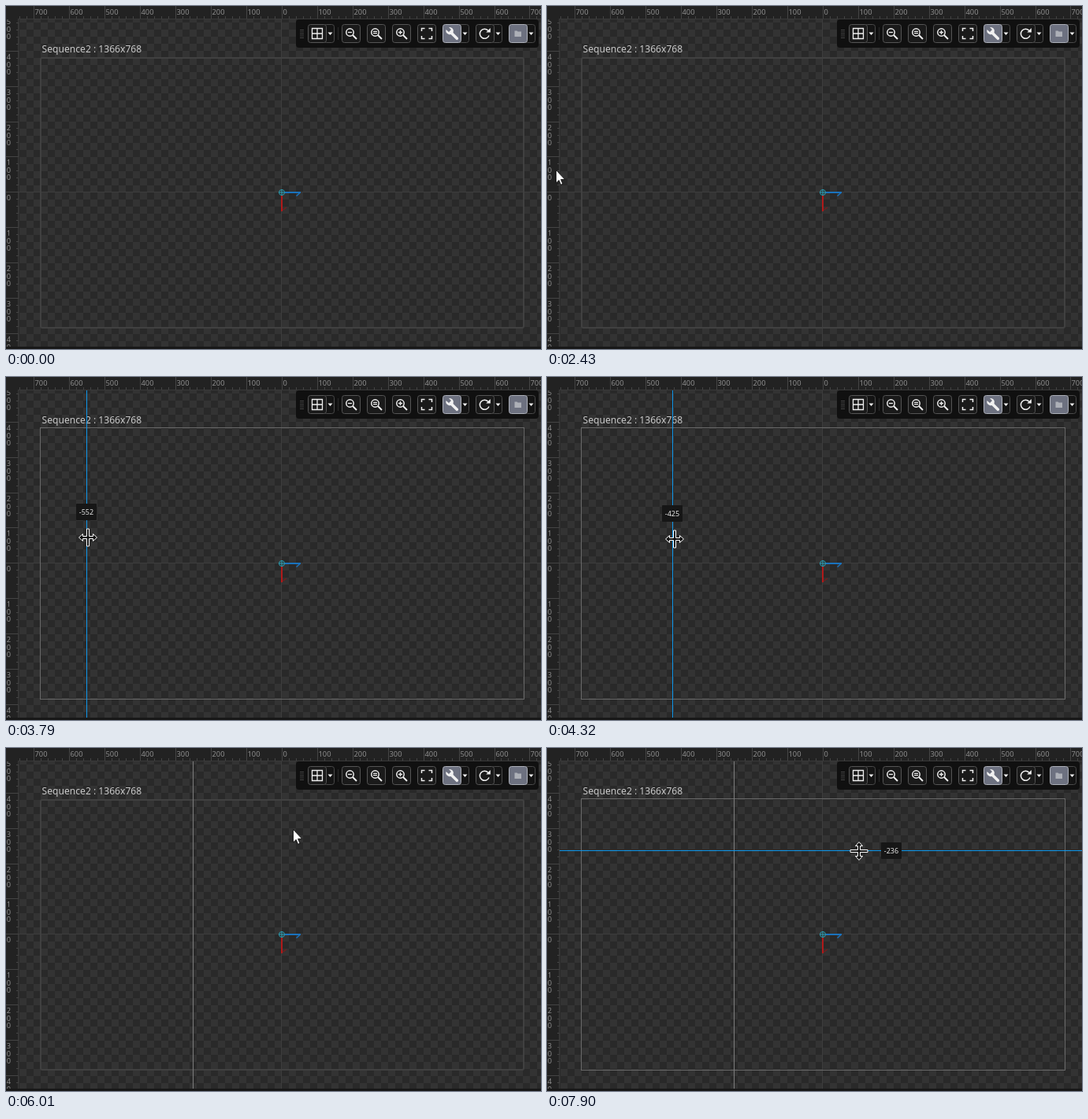
An HTML page that plays this animation: 679x436 px, repeating every 8 s.

```html
<!DOCTYPE html>
<html lang="en">
<head>
<meta charset="utf-8">
<title>Dragging guides</title>
<style>
html, body { margin: 0; width: 100%; height: 100%; overflow: hidden; background: #222; }
svg { display: block; width: 679px; height: 436px; }
text { font-family: "Noto Sans", "Open Sans", sans-serif; }
.num { font-size: 9.33px; fill: #8c8c8c; }
.tip { font-size: 9px; fill: #e4e4e4; text-anchor: middle; }
.icon { fill: none; stroke: #f0f0f0; stroke-width: 1.5; }
.faint { fill: none; stroke: #444; }
</style>
</head>
<body>
<svg id="stage" width="679" height="436" viewBox="0 0 679 436">
  <defs>
    <pattern id="checker" x="350" y="237" width="18" height="18" patternUnits="userSpaceOnUse">
      <path d="M0 0h18v18h-18z" fill="#292929"/>
      <path d="M0 0h9v9h-9zM9 9h9v9h-9z" fill="#333"/>
    </pattern>
    <clipPath id="view"><path d="M16 17H679V433H16z"/></clipPath>
    <clipPath id="side"><path d="M0 17H16V433H0z"/></clipPath>
  </defs>
  <path d="M0 0H679V436H0z" fill="#222"/>
  <g clip-path="url(#view)">
    <path d="M16 17H679V433H16z" fill="url(#checker)"/>
    <path d="M349.5 17V433M16 236.5H679" stroke="#3d3d3d"/>
    <rect id="dim" x="44" y="66" width="613" height="343" rx="2" fill="none" stroke="#404040" stroke-width="2"/>
    <rect id="lit" x="43.5" y="64.5" width="614" height="345" fill="none" stroke="#696969"/>
    <text x="45.6" y="59" font-size="12.1" fill="#c9c9c9">Sequence2 : 1366x768</text>
    <g fill="none">
      <path d="M350 241V261" stroke="#b01a1a" stroke-width="2"/>
      <path d="M351 259.5L356 256" stroke="#702020" stroke-width="1.5"/>
      <path d="M354 237H374" stroke="#1a72bd" stroke-width="2"/>
      <path d="M373 237.5L368.5 241.5" stroke="#1a72bd" stroke-width="1.5"/>
      <path d="M346 237H354M350 233V241" stroke="#2a9fb4"/>
      <circle cx="350" cy="237" r="3.5" stroke="#2a9fb4"/>
    </g>
    <rect id="lineX" y="17" width="1" height="416"/>
    <rect id="lineY" x="16" width="663" height="1"/>
    <g id="tip">
      <rect x="-13" y="-10.5" width="26" height="21" rx="1" fill="#161616"/>
      <text id="tipText" class="tip" y="3.2"></text>
    </g>
  </g>
  <g id="rulers"></g>
  <path d="M0 433H679V436H0z" fill="#181818"/>
  <g id="bar"></g>
  <path id="arrow" d="M.5 .5V17L4.2 13.5L6.6 19.3L9 18.3L6.6 12.6H11.8z" fill="#fff" stroke="#111" stroke-width=".9"/>
  <path id="split" d="M-11.5 0L-6.5 -4.5V-1.5H-1.5V-11H1.5V-1.5H6.5V-4.5L11.5 0L6.5 4.5V1.5H1.5V11H-1.5V1.5H-6.5V4.5z" fill="#111" stroke="#fff" stroke-linejoin="round"/>
</svg>
<script>
const $ = id => document.getElementById(id);
const SCALE = 0.4495, X0 = 350.3, Y0 = 236.9, LOOP = 8000, STEP = 90;
const toX = u => Math.floor(X0 + u * SCALE), toY = u => Math.floor(Y0 + u * SCALE);

function add(parent, tag, attrs, text) {
  const el = document.createElementNS("http://www.w3.org/2000/svg", tag);
  for (const k in attrs) el.setAttribute(k, attrs[k]);
  if (text !== undefined) el.textContent = text;
  parent.append(el);
  return el;
}

function drawRulers() {
  const top = add($("rulers"), "g", {});
  const side = add($("rulers"), "g", { "clip-path": "url(#side)" });
  let ticks = "";
  for (let u = -740; u <= 740; u += 20) {
    const major = u % 100 === 0, len = major ? 16 : 3;
    const x = toX(u) + 0.5, y = toY(u) + 0.5;
    if (x > 16) ticks += `M${x} ${16 - len}V16`;
    if (y > 17 && y < 433) ticks += `M${16 - len} ${y}H16`;
    if (!major) continue;
    const label = String(Math.abs(u));
    if (x > 16) add(top, "text", { class: "num", x: x + 1, y: 11.3 }, label);
    [...label].forEach((d, i) =>
      add(side, "text", { class: "num", x: 0.8, y: y + 10.6 + i * 9.5 }, d));
  }
  add(top, "path", { d: ticks, class: "faint" });
  add(top, "path", { d: "M679 16.5H15.5V433", class: "faint", opacity: 0.7 });
}

function drawBar() {
  const bar = $("bar");
  const icon = (d, style = "") => add(bar, "path", { class: "icon", d, style });
  const solid = (d, fill = "#f0f0f0") => add(bar, "path", { d, fill });
  const button = (x, on, menu) => {
    if (menu) {
      add(bar, "rect", { x: x + 20.5, y: 23.5, width: 13, height: 23, rx: 3, fill: "#141414", stroke: "#494949" });
      solid(`M${x + 25.5} 33.5h6l-3 3.5z`);
    }
    add(bar, "rect", { x: x + 0.5, y: 23.5, width: 23, height: 23, rx: 3,
      fill: on ? "#6d7180" : "#1a1a1a", stroke: on ? "#adb0b8" : "#555" });
  };
  const lens = (x, sign) => {
    button(x);
    add(bar, "circle", { class: "icon", cx: x + 10.5, cy: 33.5, r: 4.7 });
    icon(`M${x + 14} 37l5 5`, "stroke-width:2");
    icon(`M${x + 10.5} 33.5${sign}`, "stroke-width:1.3");
  };
  solid("M372 17H672a4 4 0 0 1 4 4V49a4 4 0 0 1 -4 4H372a4 4 0 0 1 -4 -4V21a4 4 0 0 1 4 -4", "#101010");
  for (let y = 30.5; y < 42; y += 2.5) add(bar, "path", { d: `M373 ${y}h5`, class: "faint" });
  add(bar, "path", { d: "M421.5 27V43", class: "faint", opacity: 0.5 });
  button(383, false, true);
  icon("M388.5 28.5h13v13h-13zM395 28.5v13M388.5 35h13", "stroke-width:1.3");
  lens(426, "m-2.5 0h5");
  lens(458, "m-2.5 -1.2h5m-5 2.4h5");
  lens(490, "m-2.5 0h5m-2.5 -2.5v5");
  button(522);
  icon("M527.5 32v-3.5h4M536.5 28.5h4v3.5M540.5 38v3.5h-4M531.5 41.5h-4v-3.5");
  button(554, true, true);
  icon("M565 34L572.3 41.3", "stroke-width:3.6;stroke-linecap:round");
  solid("M558.5 30L562 33L565 30L562 27A5 5 0 0 1 567.5 34A5 5 0 0 1 558.5 30");
  button(596, false, true);
  icon("M611.8 31.2A6 6 0 1 0 613 37.5");
  solid("M614.8 28v5.5h-5.5z");
  button(638, true, true);
  solid("M645.5 31.5h3l1 1h4.5v6.5h-8.5z", "#adb0b7");
}

// Key poses: time, pointer x, pointer y, value of the dragged guide
const POSES = [
  [1470, 156, 410, -760],
  [2430, 11, 208, -760],
  [3070, 11, 206, -760],
  [3880, 116, 204, -526],
  [3900, 116, 204, -526],
  [4800, 231, 208, -274],
  [4980, 238, 209, -250],
  [5830, 238, 209, -250],
  [6010, 364, 103, -250],
  [6450, 355, 2, -520],
  [6730, 356, 8, -520],
  [7270, 392, 113, -283],
  [7900, 396, 131, -236]
];
const REST_X = -250;
const easeOut = p => 1 - (1 - p) ** 2;

// Each stretch between two poses moves in steps of equal length
function pose(ms) {
  const n = POSES.findIndex(p => p[0] > ms);
  if (n < 1) return POSES.at(n);
  const a = POSES[n - 1], b = POSES[n];
  const held = Math.floor((ms - a[0]) / STEP) * STEP;
  const p = held / (b[0] - a[0]);
  const k = n === 1 || n === POSES.length - 1 ? easeOut(p) : p;
  return a.map((v, i) => Math.round(v + (b[i] - v) * k));
}

const show = (id, on) => { $(id).style.display = on ? "" : "none"; };
const move = (id, x, y, turn = 0) => $(id).setAttribute("transform", `translate(${x} ${y}) rotate(${turn})`);

function guide(axis, pos, on, active) {
  const line = $("line" + axis.toUpperCase());
  line.setAttribute(axis, pos);
  line.setAttribute("fill", active ? "#0d96ea" : "#7c7c7c");
  line.style.display = on ? "" : "none";
}

function render(ms) {
  const [, px, py, value] = pose(ms);
  const dragX = ms >= 2860 && ms < 5830, dragY = ms >= 6730;
  const lit = (dragX && ms < 5680) || dragY;
  show("lit", lit);
  show("dim", !lit);

  const gx = toX(ms < 4980 ? value : REST_X), gy = toY(value);
  guide("x", gx, ms >= 2860, ms < 4800);
  guide("y", gy, dragY, ms >= 7540);

  show("tip", dragY ? gy > 16 : dragX && gx > 16 && ms < 5410);
  $("tipText").textContent = value;
  if (dragY) move("tip", px + 41, gy + 0.5);
  else move("tip", gx, py - 32.5);

  show("arrow", ms >= 1470 && !dragX && !dragY);
  show("split", dragX || dragY);
  move("arrow", px, py);
  move("split", px, py, dragY ? 90 : 0);
}

function tick() {
  render(Math.round(performance.now()) % LOOP);
  requestAnimationFrame(tick);
}

drawRulers();
drawBar();
tick();
</script>
</body>
</html>
```
